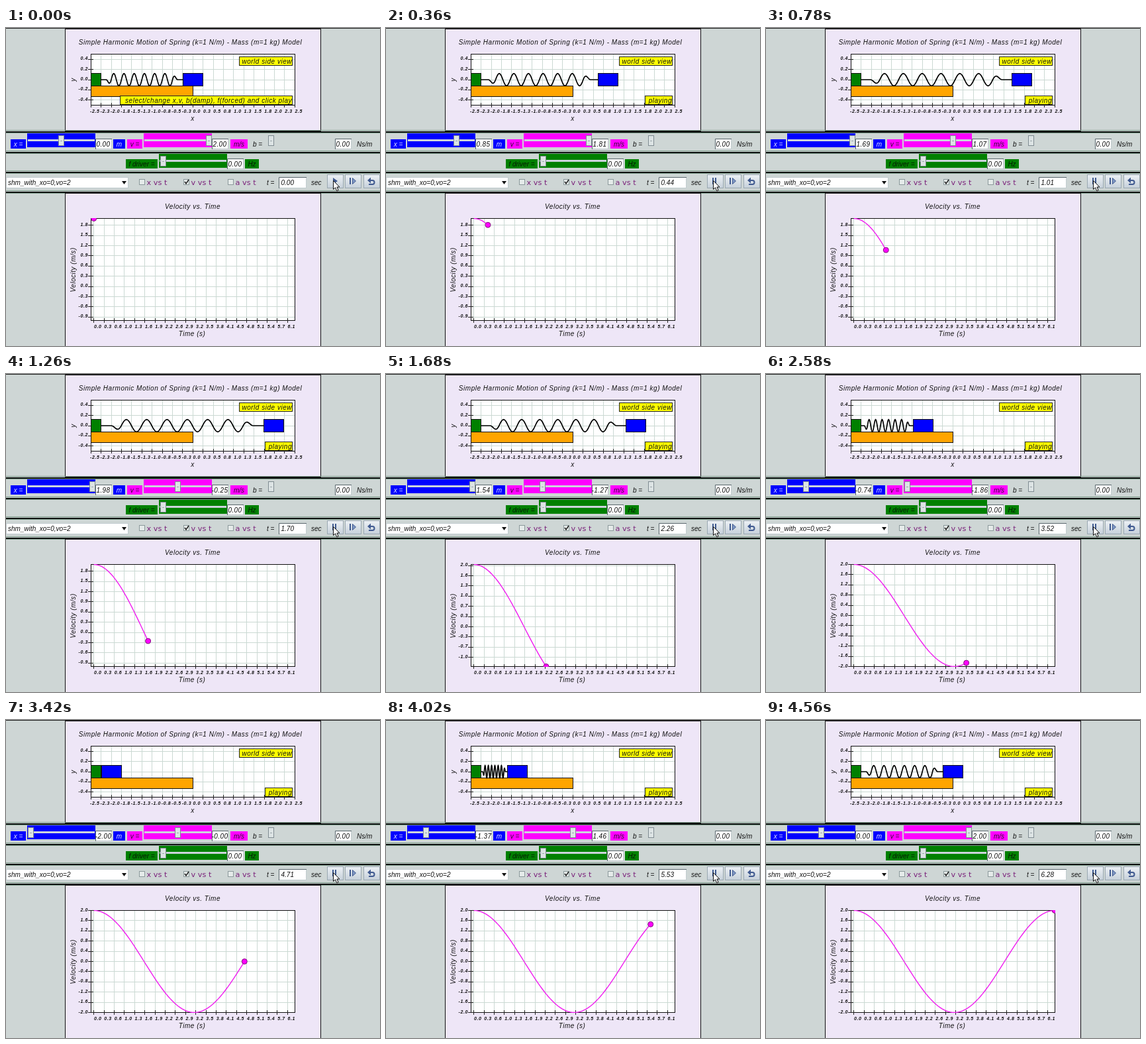
Recreate the animation shown at these times as an HTML page with a canvas. Size 565 by 480 pixels, loop 4620 ms.

```html
<!DOCTYPE html>
<html lang="en">
<head>
<meta charset="utf-8">
<title>Spring and mass</title>
<style>
  html, body { margin: 0; width: 100%; height: 100%; overflow: hidden; background: #ced6d5; }
  canvas { display: block; }
</style>
</head>
<body>
<canvas id="stage" width="565" height="480"></canvas>
<script>
const ctx = document.getElementById('stage').getContext('2d');
const STEP_MS = 60, STEPS = 77, DT = Math.PI / 50;
const SANS = '"Liberation Sans", Arial, sans-serif';
const BLUE = '#0000ff', MAGENTA = '#ff00ff', GREEN = '#008000', INK = '#111';
const TOP = { x: 128, y: 39, w: 309, h: 78 };
const LOW = { x: 128, y: 287, w: 309, h: 155 };
const CELL = 15.4;

function box(x, y, w, h, fill, stroke) {
  ctx.fillStyle = fill;
  ctx.fillRect(x, y, w, h);
  if (stroke) frame(x, y, w, h, stroke);
}

function frame(x, y, w, h, color) {
  ctx.strokeStyle = color;
  ctx.lineWidth = 1;
  ctx.strokeRect(x + .5, y + .5, w - 1, h - 1);
}

function line(points, color, width = 1) {
  ctx.beginPath();
  points.forEach(([x, y]) => ctx.lineTo(x, y));
  ctx.strokeStyle = color;
  ctx.lineWidth = width;
  ctx.stroke();
}

function shape(points, fill, stroke) {
  ctx.beginPath();
  points.forEach(([x, y]) => ctx.lineTo(x, y));
  ctx.closePath();
  ctx.fillStyle = fill;
  ctx.fill();
  if (stroke) {
    ctx.strokeStyle = stroke;
    ctx.lineWidth = 1;
    ctx.stroke();
  }
}

function text(s, x, y, { size = 10, align = 'left', color = INK, style = 'italic', family = SANS, gap = 0 } = {}) {
  ctx.font = `${style} ${size}px ${family}`;
  ctx.letterSpacing = `${gap}px`;
  ctx.textAlign = align;
  ctx.textBaseline = 'alphabetic';
  ctx.fillStyle = color;
  ctx.fillText(s, x, y);
}

function caption(s, x, y, align = 'center') {
  text(s, x, y, { align, gap: .52 });
}

function upright(s, x, y) {
  ctx.save();
  ctx.translate(x, y);
  ctx.rotate(-Math.PI / 2);
  caption(s, 0, 0);
  ctx.restore();
}

function clipped(p, draw) {
  ctx.save();
  ctx.beginPath();
  ctx.rect(p.x, p.y, p.w, p.h);
  ctx.clip();
  draw();
  ctx.restore();
}

const crisp = value => Math.floor(value) + .5;

// Ticks are lists of [position, label].
function plot(p, xTicks, yTicks) {
  const right = p.x + p.w, bottom = p.y + p.h;
  const small = { size: 7, style: 'italic bold', gap: .6 };
  box(p.x, p.y, p.w, p.h, '#fff');
  for (const [x] of xTicks) line([[crisp(x), p.y], [crisp(x), bottom]], '#cbd9d3');
  for (const [y] of yTicks) line([[p.x, crisp(y)], [right, crisp(y)]], '#cbd9d3');
  frame(p.x, p.y, p.w, p.h, '#111');
  for (const [x, s] of xTicks) {
    line([[crisp(x), bottom - 4], [crisp(x), bottom + 3]], '#222');
    text(s, x + 6, bottom + 11, { ...small, align: 'center' });
  }
  for (const [y, s] of yTicks) {
    line([[p.x - 4, crisp(y)], [p.x + 4, crisp(y)]], '#222');
    text(s, 124, y + 1, { ...small, align: 'right' });
  }
}

function ticks(from, to, step, place) {
  const list = [];
  for (let i = from; i <= to; i++) list.push([place(i), (i * step).toFixed(1)]);
  return list;
}

function note(s, x, y) {
  box(x, y, 433 - x, 14, '#ffff00', '#222');
  caption(s, 432, y + 11, 'right');
}

function spring(x0, x1) {
  const loops = 8, perLoop = 20, points = [];
  if (x1 - x0 < 1) return;
  for (let i = 0; i <= loops * perLoop; i++) {
    const u = i / perLoop;
    const edge = Math.min(u, loops - u);
    const gain = Math.max(0, Math.min(1, edge * 2 - 1));
    points.push([x0 + (x1 - x0) * u / loops, 78 - 9.3 * gain * Math.sin(2 * Math.PI * u)]);
  }
  line(points, '#000', 1.7);
}

function sideView(x, playing) {
  box(89, 1, 387, 155, '#eee6f7', '#111');
  caption('Simple Harmonic Motion of Spring (k=1 N/m) - Mass (m=1 kg) Model', 278.5, 25);
  plot(TOP, ticks(-10, 10, .25, i => 282.3 + i * CELL), ticks(-2, 2, .2, i => 78 - i * CELL));
  upright('y', 105, 78);
  caption('x', 282, 140);
  const left = Math.round(267 + x * 61.7);
  clipped(TOP, () => {
    box(128, 87, 155, 17, '#ffa500', '#111');
    box(128, 68, 16, 20, GREEN, '#111');
    spring(143.5, left);
    box(left, 68, 31, 20, BLUE, '#111');
  });
  note('world side view', 352, 43);
  if (playing) note('playing', 391, 102);
  else note('select/change x,v, b(damp), f(forced) and click play', 172, 102);
}

function sunken(x, y, w, h) {
  box(x, y, w, h, '#fff', '#c3cdd0');
  line([[x + .5, y + h], [x + .5, y + .5], [x + w, y + .5]], '#59666c');
}

function field(x, y, value) {
  sunken(x, y, 25, 16);
  text(value, x + 12, y + 12, { align: 'center', gap: .4 });
}

function tag(s, x, y, w, fill, color) {
  box(x, y, w, 14, fill);
  text(s, x + w / 2, y + 11, { align: 'center', color });
}

function thumb(x, y) {
  box(x - 4, y, 9, 16, '#dde4e5', '#808c92');
  line([[x - 1, y + 8.5], [x + 2, y + 8.5]], '#9aa5aa');
}

function slider(x, y, fill, at) {
  box(x, y, 103, 21, fill);
  box(x + 1, y + 9, 101, 3, '#ccd3dc');
  thumb(at, y + 3);
}

function check(x, s, on) {
  box(x, 228, 9, 9, '#e6ebea', '#8b999b');
  if (on) line([[x + 2, 232], [x + 4, 235], [x + 8, 229]], '#222', 1.5);
  text(s, x + 11.5, 237, { size: 11.3, style: 'normal', color: '#7a207a', family: '"DejaVu Sans", sans-serif' });
}

function button(x, w) {
  const g = ctx.createLinearGradient(0, 221, 0, 243);
  g.addColorStop(0, '#eef2f6');
  g.addColorStop(1, '#c3ced8');
  box(x, 221, w, 21, g, '#9aa8b2');
}

function buttons(playing) {
  const slate = '#405a90';
  button(485, 25);
  button(512, 25);
  button(540, 25);
  if (playing) {
    box(493, 226, 2, 10, slate);
    box(497, 226, 2, 10, slate);
  } else {
    shape([[494, 226], [501, 231], [494, 236]], slate);
  }
  box(519, 226, 2, 10, slate);
  shape([[523.5, 226.5], [528.5, 231], [523.5, 235.5]], '#7f97c4', slate);
  ctx.beginPath();
  ctx.moveTo(549, 230);
  ctx.lineTo(553.5, 230);
  ctx.arc(553.5, 233, 3, -Math.PI / 2, Math.PI / 2);
  ctx.lineTo(548, 236);
  ctx.strokeStyle = slate;
  ctx.lineWidth = 2;
  ctx.stroke();
  shape([[546, 230], [551, 225.5], [551, 234.5]], slate);
}

function cursor(x, y) {
  const arrow = [[0, 0], [0, 13], [3, 10.3], [5.3, 15.5], [7.6, 14.5], [5.4, 9.5], [9.4, 9.5]];
  shape(arrow.map(([a, b]) => [x + a, y + b]), '#fff', '#111');
}

function rowEdge(y) {
  box(0, y - 2, 565, 1, '#7d9a8a');
  box(0, y, 565, 2, '#0c110f');
  box(0, y + 2, 565, 1, '#7d9a8a');
}

function controls(t, x, v, playing) {
  [156, 187, 217, 247].forEach(rowEdge);
  const snap = value => Math.round(value) * 23.25;

  tag('x =', 7, 168, 23, BLUE, '#e4e8ff');
  slider(32, 159, BLUE, Math.round(83 + snap(x)));
  field(135, 167, x.toFixed(2));
  tag('m', 162, 168, 18, BLUE, '#e4e8ff');

  tag('v =', 183, 168, 23, MAGENTA, '#301030');
  slider(208, 159, MAGENTA, Math.round(259 + snap(v)));
  field(311, 167, v.toFixed(2));
  tag('m/s', 339, 168, 26, MAGENTA, '#301030');

  text('b =', 373, 179);
  thumb(400, 162);
  field(497, 167, '0.00');
  text('Ns/m', 530, 179);

  tag('f driver =', 181, 198, 48, GREEN, '#061806');
  slider(231, 190, GREEN, 237);
  field(334, 197, '0.00');
  tag('Hz', 361, 198, 21, GREEN, '#061806');

  box(0, 225, 185, 17, '#fff', '#c0cace');
  text('shm_with_xo=0,vo=2', 3, 237);
  shape([[175, 231], [182, 231], [178.5, 236]], '#111');
  check(201, 'x vs t', false);
  check(268, 'v vs t', true);
  check(335, 'a vs t', false);
  text('t =', 394, 237);
  sunken(412, 225, 42, 17);
  text(t.toFixed(2), 415.5, 237);
  text('sec', 461, 237);
  buttons(playing);
  cursor(494.5, 230.5);
}

function graph(t, v, count) {
  const low = t > 3.14 ? -2 : Math.min(-1, v);
  const step = (2 - low) / 10;
  const py = value => LOW.y + .5 + (2 - value) / (2 - low) * (LOW.h - 1);
  const px = time => 132.7 + time * 48.3;
  box(89, 249, 387, 232, '#eee6f7', '#111');
  caption('Velocity vs. Time', 282, 273);
  const first = Math.ceil(low / step - 1e-6), last = Math.floor(2 / step + 1e-6);
  plot(LOW, ticks(0, 19, .319, i => px(0) + i * CELL), ticks(first, last, step, i => py(i * step)));
  upright('Velocity (m/s)', 105, 365);
  caption('Time (s)', 281, 465);
  clipped(LOW, () => {
    const trail = Array.from({ length: count + 1 }, (_, i) => [px(i * DT), py(2 * Math.cos(i * DT))]);
    line(trail, '#f01cf0', 1.4);
    ctx.beginPath();
    ctx.arc(px(t), py(v), 4, 0, 2 * Math.PI);
    ctx.fillStyle = MAGENTA;
    ctx.fill();
    ctx.strokeStyle = '#80107a';
    ctx.lineWidth = 1;
    ctx.stroke();
  });
}

function draw() {
  const n = Math.floor(performance.now() / STEP_MS) % STEPS;
  const count = Math.max(0, Math.round((n - 1) * 4 / 3));
  const t = count * DT, x = 2 * Math.sin(t), v = 2 * Math.cos(t);
  box(0, 0, 565, 480, '#ced6d5');
  box(0, 0, 565, 1, '#222');
  sideView(x, n > 0);
  controls(t, x, v, n > 0);
  graph(t, v, count);
  requestAnimationFrame(draw);
}
draw();
</script>
</body>
</html>
```
